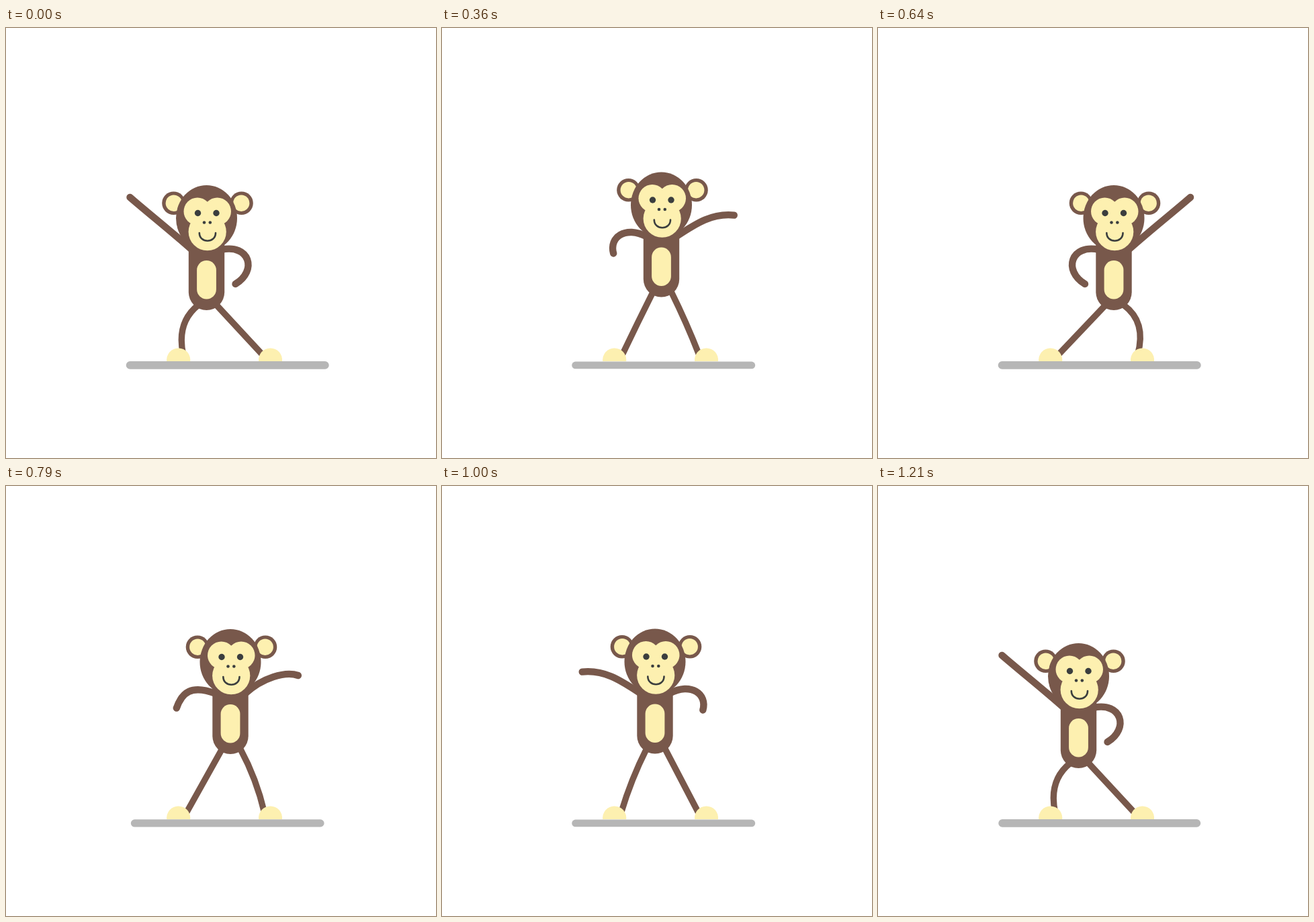
An HTML page for the animation above (1.28 s loop, 640 px wide and 640 px high).

```html
<!DOCTYPE html>
<html lang="en">
<head>
<meta charset="utf-8">
<title>Dancing monkey</title>
<style>
  html, body { margin: 0; width: 100%; height: 100%; overflow: hidden; background: #fff; }
  svg { display: block; width: 100%; height: 100%; }
  .brown { fill: #78584b; }
  .cream { fill: #fdf0b0; }
  .dark { fill: #3b3e3e; }
  .limb { fill: none; stroke: #78584b; stroke-linecap: round; }
  .arm { stroke-width: 10.4; }
  .leg { stroke-width: 9.3; }
</style>
</head>
<body>
<svg viewBox="0 0 640 640">
  <rect id="floor" x="-151" y="-5.9" width="302" height="11.8" rx="5.9" fill="#b6b6b6"/>
  <path id="armL" class="limb arm"/>
  <path id="armR" class="limb arm"/>
  <path id="legL" class="limb leg"/>
  <path id="legR" class="limb leg"/>
  <path class="cream" d="M239.2 496a17.6 17.6 0 1 1 35 0z"/>
  <path class="cream" d="M376 496a17.6 17.6 0 1 1 35 0z"/>
  <!-- origin: centre of the top of the head -->
  <g id="monkey">
    <path class="brown" d="M-26.7 86H26.7V159.3a26.7 26.7 0 0 1-53.4 0z"/>
    <rect class="cream" x="-14.4" y="112" width="28.8" height="57.5" rx="14.4"/>
    <g class="brown">
      <circle cx="-49" cy="26.7" r="17.3"/>
      <circle cx="52" cy="26.7" r="17.3"/>
    </g>
    <g class="cream">
      <circle cx="-48.7" cy="26.7" r="12.2"/>
      <circle cx="51.7" cy="26.7" r="12.2"/>
    </g>
    <ellipse class="brown" cy="49" rx="45.5" ry="49"/>
    <g class="cream">
      <circle cx="-13.5" cy="39" r="20.5"/>
      <circle cx="16" cy="39" r="20.5"/>
      <circle cx="1.2" cy="69.2" r="28.1"/>
    </g>
    <g class="dark">
      <circle cx="-13" cy="41.5" r="4.7"/>
      <circle cx="14.5" cy="41.5" r="4.7"/>
      <circle cx="-3.5" cy="55.5" r="2.3"/>
      <circle cx="5.3" cy="55.5" r="2.3"/>
    </g>
    <path d="M-10.7 71c0 15.6 24.2 15.6 24.2 0" fill="none" stroke="#3b3e3e" stroke-width="2.6" stroke-linecap="round"/>
  </g>
</svg>
<script>
const $ = id => document.getElementById(id);
const HALF = 9;      // steps in one hop
const HOP = 8;       // steps in motion, then a rest

// Head positions of each hop: lean, rise, fall, land
const hops = [
  [{ s: 0, x: 298.5, y: 234 }, { s: 2, x: 311, y: 215.5 }, { s: 5, x: 326.5, y: 214.5 }, { s: 8.6, x: 351, y: 234 }],
  [{ s: 0, x: 351, y: 234 }, { s: 2, x: 334, y: 213 }, { s: 5, x: 317, y: 212.5 }, { s: 7.6, x: 298.5, y: 234 }]
];

// Arm shapes from the shoulder, outward and down: two handles and the hand
const up = [29, -26, 63, -53, 92, -78];
const down = [42, -9, 54, 31, 21, 51];
const dropping = [27, -21, 58, -19, 67, -1];
const lifting = [34, -17, 51, -18, 74, -1];

// Smooth curve through the keys, at rest at both ends
function along(keys, s, axis) {
  const last = keys.length - 1;
  s = Math.min(s, keys[last].s);
  const slope = k => {
    if (k === 0 || k === last) return 0;
    const [a, b, c] = keys.slice(k - 1, k + 2);
    const h = b.s - a.s, g = c.s - b.s;
    return ((b[axis] - a[axis]) / h * g + (c[axis] - b[axis]) / g * h) / (h + g);
  };
  let k = 0;
  while (k < last - 1 && s >= keys[k + 1].s) k++;
  const a = keys[k], b = keys[k + 1], h = b.s - a.s, u = (s - a.s) / h, v = 1 - u;
  return v * v * (1 + 2 * u) * a[axis] + u * u * (3 - 2 * u) * b[axis] +
    h * u * v * (v * slope(k) - u * slope(k + 1));
}

// Swing from one arm shape through a second to a third
const swing = (from, via, to, e) => from.map((a, i) =>
  a * (1 - e) * (1 - 2 * e) + via[i] * 4 * e * (1 - e) + to[i] * e * (2 * e - 1));

function drawArm(id, side, x, y, falls, e) {
  const shape = falls ? swing(up, dropping, down, e) : swing(down, lifting, up, e);
  const sx = x + side * 22, sy = y + 96;
  const points = shape.map((n, i) => i % 2 ? sy + n : sx + side * n);
  $(id).setAttribute('d', `M${sx} ${sy}C${points.join(' ')}`);
}

// A leg bows outward as its hip comes over the foot
function drawLeg(id, side, x, y) {
  const hx = x + 1.2 + side * 13.7, hy = y + 178.5;
  const foot = 325.1 + side * 68.4;
  const reach = side * (foot - hx) - 8;
  const bow = Math.max(0, 54 - reach) ** 2 / 100;
  const ax = foot - side * (12 - Math.min(5, bow)), ay = 486;
  const bx = (hx + ax) / 2 + side * 2 * bow, by = (hy + ay) / 2 - bow;
  $(id).setAttribute('d', `M${hx} ${hy}Q${bx} ${by} ${ax} ${ay}`);
}

function draw(step) {
  const s = step % HALF, rightward = step < HALF;
  const keys = hops[rightward ? 0 : 1];
  const x = along(keys, s, 'x'), y = along(keys, s, 'y');
  const e = 1 - (1 - Math.min(1, s / HOP)) ** 1.3;
  const scale = 1 - 0.104 * Math.sin(Math.PI * Math.min(1, s / 8.5)) ** 2;

  $('monkey').setAttribute('transform', `translate(${x} ${y})`);
  $('floor').setAttribute('transform', `translate(329.7 501.9) scale(${scale})`);
  drawArm('armL', -1, x, y, rightward, e);
  drawArm('armR', 1, x, y, !rightward, e);
  drawLeg('legL', -1, x, y);
  drawLeg('legR', 1, x, y);
}

// Eighteen held steps of 70 ms; two of them last 80 ms
const LOOP = 1280;
const starts = Array.from({ length: 2 * HALF }, (_, k) => k * 70 + (k > 3 ? 10 : 0) + (k > 10 ? 10 : 0));
const origin = performance.now();
let shown = -1;

function tick() {
  const t = (performance.now() - origin) % LOOP;
  const step = starts.filter(at => at <= t).length - 1;
  if (step !== shown) draw(shown = step);
  requestAnimationFrame(tick);
}
tick();
</script>
</body>
</html>
```
